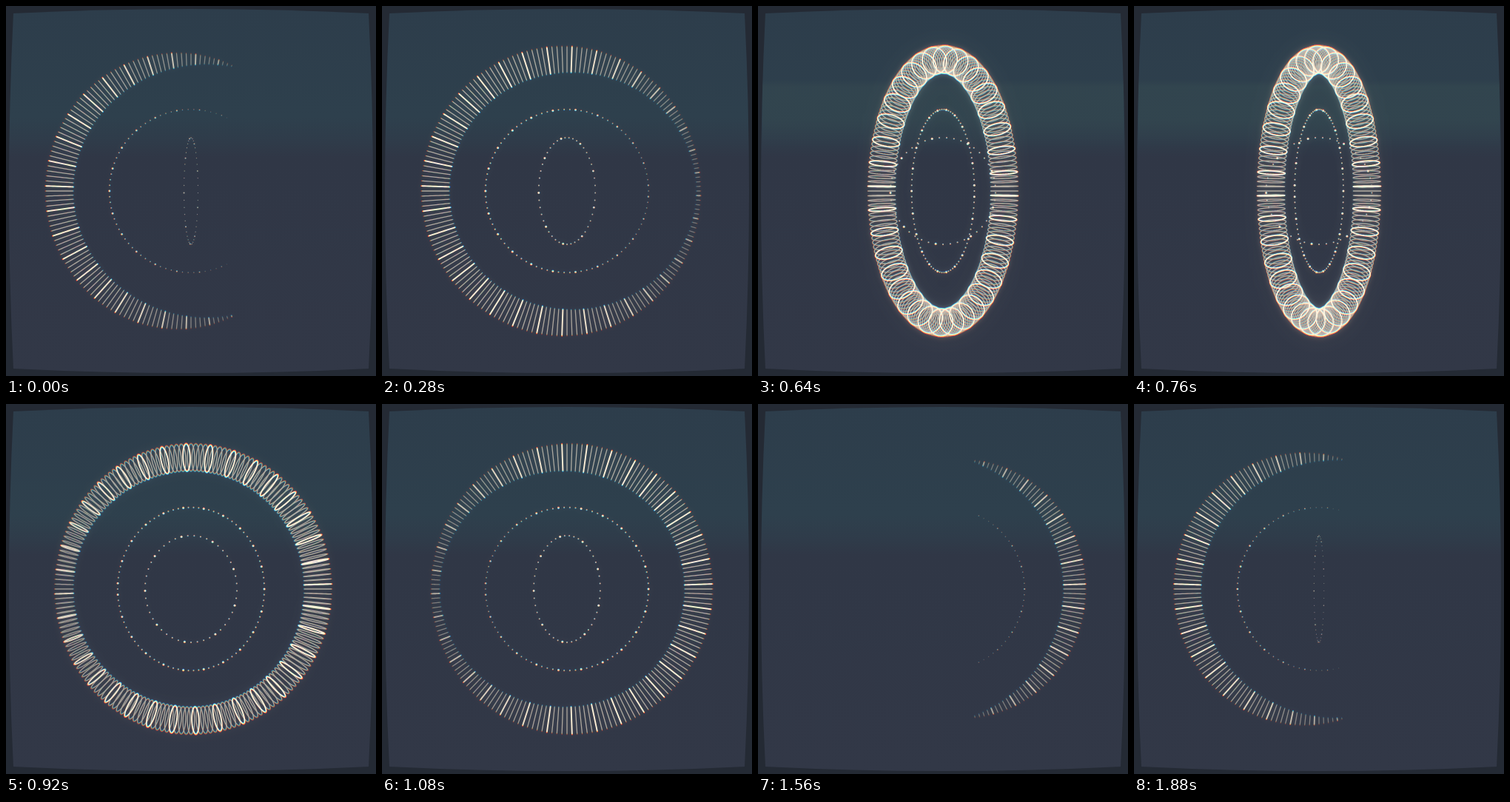
These frames come from a looping animation (500x500 px, 1.92 s). An HTML page with a canvas:

```html
<!DOCTYPE html>
<html lang="en">
<head>
<meta charset="utf-8">
<title>Turning rings</title>
<style>
html, body { margin: 0; width: 100%; height: 100%; overflow: hidden; background: #242a34; }
canvas { display: block; width: 500px; height: 500px; }
</style>
</head>
<body>
<canvas id="stage" width="500" height="500"></canvas>
<script>
const LOOP = 1920, STEP = 40, SHIFT = 252, MID = 960;
const RAD = Math.PI / 180;
const ctx = document.getElementById('stage').getContext('2d');
const layer = document.createElement('canvas');
layer.width = layer.height = 500;
const pen = layer.getContext('2d');

const clamp = (v, lo, hi) => Math.max(lo, Math.min(hi, v));

// Each channel group is scaled a little differently to fringe the edges.
const PASSES = [
  { zoom: 1.005, tint: [255, 0, 0] },
  { zoom: 1, tint: [0, 236, 0] },
  { zoom: 0.997, tint: [0, 0, 198] }
];

// Half turn in degrees, from -90 to 90, eased over the given span.
const turn = (tau, span) => 90 * Math.sin(Math.PI * clamp((tau - MID) / span, -0.5, 0.5));

// Size of a part at x as the wave passes from left to right.
function grow(x, tau) {
  const near = Math.min(tau, LOOP - tau);
  const front = -178 + 8.1 * Math.pow(near, 0.61);
  const d = clamp((front + (tau < MID ? -x : x)) / 260, 0, 1);
  return 1 - (1 - d) * (1 - d);
}

const shade = (tint, k) => 'rgb(' + tint.map(v => Math.round(v * k)).join(',') + ')';

function torus(tau, tint) {
  const th = (90 + turn(tau, 680)) * RAD;
  const c = Math.cos(th), s = Math.sin(th), R = 177.5;
  for (const strong of [false, true]) {
    for (let i = 0; i < 180; i++) {
      if ((i % 5 === 1) !== strong) continue;
      const ex = Math.cos(i * 2 * RAD) * c, ey = Math.sin(i * 2 * RAD);
      const k = grow(R * ex, tau), r = 18.5 * k;
      if (r < 0.4) continue;
      pen.beginPath();
      for (let j = 0; j < 32; j++) {
        const a = j * Math.PI / 16, p = R + r * Math.cos(a);
        pen.lineTo(p * ex + r * Math.sin(a) * s, p * ey);
      }
      pen.closePath();
      pen.lineWidth = strong ? 1.9 : 1.3;
      pen.strokeStyle = shade(tint, (strong ? 1 : 0.6) * (0.45 + 0.55 * k));
      pen.stroke();
    }
  }
}

function dots(tau, tint, ring) {
  const c = Math.cos((ring.base + turn(tau, ring.span)) * RAD);
  for (let i = 0; i < ring.count; i++) {
    const a = (ring.start + i * 360 / ring.count) * RAD;
    const x = ring.R * Math.cos(a) * c, y = ring.R * Math.sin(a);
    const k = grow(x, tau), strong = i % ring.every === ring.pick;
    if (k < 0.04) continue;
    pen.fillStyle = shade(tint, (strong ? 0.92 : 0.7) * (0.4 + 0.6 * k));
    pen.beginPath();
    pen.arc(x, y, (strong ? 1.5 : 1.05) * (0.4 + 0.6 * k), 0, 7);
    pen.fill();
  }
}

const MIDDLE = { R: 110, count: 90, start: 0, every: 4, pick: 1, base: 90, span: 840 };
const INNER = { R: 72, count: 45, start: 2, every: 5, pick: 2, base: 0, span: 1920 };

function screenShape() {
  ctx.beginPath();
  ctx.moveTo(10, 10);
  ctx.quadraticCurveTo(250, -2, 490, 10);
  ctx.quadraticCurveTo(502, 250, 490, 490);
  ctx.quadraticCurveTo(250, 502, 10, 490);
  ctx.quadraticCurveTo(-2, 250, 10, 10);
}

function backdrop(flash) {
  ctx.fillStyle = '#242a34';
  ctx.fillRect(0, 0, 500, 500);
  const g = ctx.createLinearGradient(0, 0, 0, 500);
  g.addColorStop(0, '#2d3d4b');
  g.addColorStop(0.3, '#2e404d');
  g.addColorStop(0.36, '#2f3c4a');
  g.addColorStop(0.41, '#303746');
  g.addColorStop(1, '#323847');
  screenShape();
  ctx.fillStyle = g;
  ctx.fill();
  if (flash > 0.01) {
    const b = ctx.createLinearGradient(0, 100, 0, 190);
    b.addColorStop(0, 'rgba(54,74,80,0)');
    b.addColorStop(0.1, 'rgba(54,74,80,0.6)');
    b.addColorStop(0.6, 'rgba(54,74,80,0.55)');
    b.addColorStop(1, 'rgba(54,74,80,0)');
    ctx.globalAlpha = flash;
    ctx.fillStyle = b;
    ctx.fillRect(6, 100, 488, 90);
    ctx.globalAlpha = 1;
  }
}

function draw(t) {
  const tau = (t + SHIFT) % LOOP;
  pen.setTransform(1, 0, 0, 1, 0, 0);
  pen.globalCompositeOperation = 'source-over';
  pen.fillStyle = '#000';
  pen.fillRect(0, 0, 500, 500);
  pen.globalCompositeOperation = 'lighten';
  pen.lineJoin = 'round';
  for (const { zoom, tint } of PASSES) {
    pen.setTransform(zoom, 0, 0, zoom, 250, 250);
    torus(tau, tint);
    dots(tau, tint, MIDDLE);
    dots(tau, tint, INNER);
  }

  const flash = Math.pow(Math.cos(turn(tau, 680) * RAD), 2);
  backdrop(flash);
  ctx.save();
  screenShape();
  ctx.clip();
  ctx.globalCompositeOperation = 'screen';
  ctx.drawImage(layer, 0, 0);
  ctx.filter = 'blur(3px)';
  ctx.globalAlpha = 0.16 + 0.16 * flash;
  ctx.drawImage(layer, 0, 0);
  ctx.filter = 'blur(12px)';
  ctx.globalAlpha = 0.03 + 0.09 * flash;
  ctx.drawImage(layer, 0, 0);
  ctx.restore();
}

const start = performance.now();
let last = -1;
function frame() {
  const t = Math.floor(((performance.now() - start) % LOOP) / STEP) * STEP;
  if (t !== last) draw(last = t);
  requestAnimationFrame(frame);
}
frame();
</script>
</body>
</html>
```
